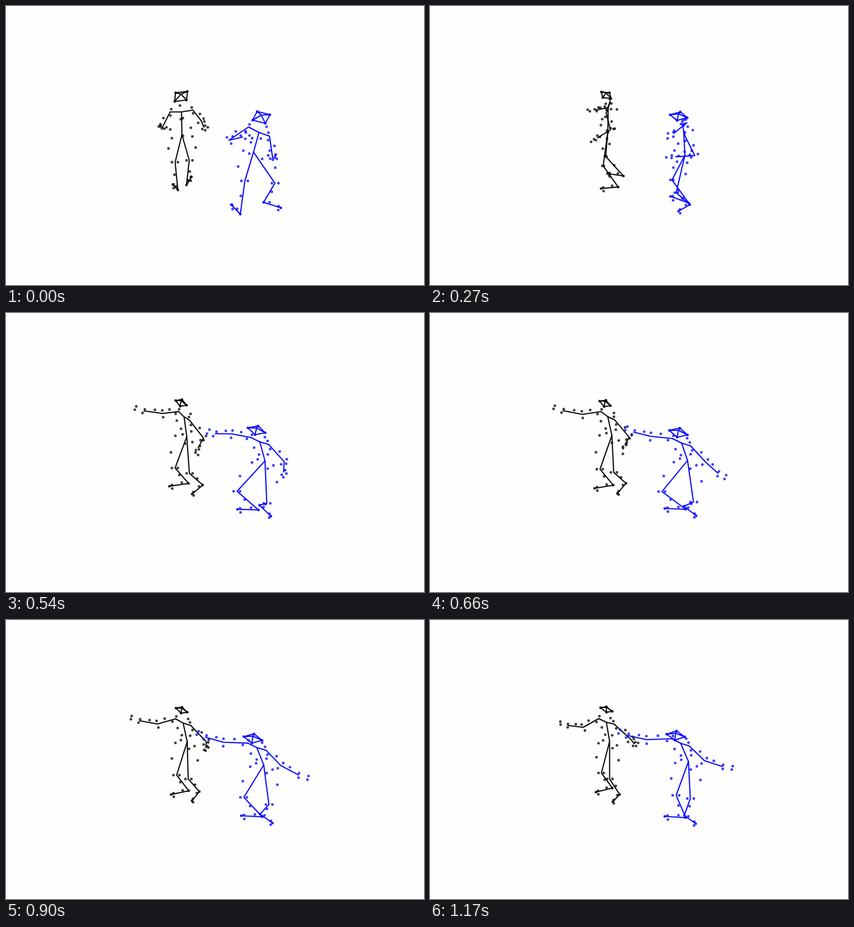
Recreate the animation shown at these times as an HTML page with a canvas. Size 917x611 px, loop 1200 ms.

```html
<!DOCTYPE html>
<html lang="en">
<head>
<meta charset="utf-8">
<title>Two motion-capture skeletons</title>
<style>
html, body { margin: 0; width: 100%; height: 100%; overflow: hidden; background: #fefefe; }
canvas { display: block; }
</style>
</head>
<body>
<canvas id="stage" width="917" height="611"></canvas>
<script>
const ctx = document.getElementById('stage').getContext('2d');
const LOOP = 1200, STEP = 30, TILT = 0.6;
const times = [0, 180, 390, 660, 1170];

// x, y at the key times. l/r: left/right; s shoulder, e elbow, w wrist, k knee, a ankle, t toe.
// The left shoulder and left head corners mirror the right ones through chest and head.
const small = {
  head:  [384,198, 387,196, 385,195, 384,198, 387,196],
  rf:    [398,187, 379,186, 373,189, 372,193, 374,192],
  rb:    [396,206, 397,195, 388,187, 386,191, 387,190],
  chest: [385,230, 390,221, 391,225, 390,225, 387,222],
  rs:    [410,228, 403,212, 385,214, 375,216, 370,216],
  pelvis:[386,282, 389,275, 392,275, 399,268, 394,266],
  le: [345,262, 375,268, 421,274, 437,272, 440,261],
  lw: [343,266, 342,278, 405,300, 428,288, 448,271],
  re: [428,251, 408,228, 365,220, 334,222, 336,235],
  rw: [434,265, 391,237, 330,220, 292,214, 303,231],
  lk: [371,342, 369,347, 396,353, 403,349, 394,348],
  la: [377,403, 399,403, 428,386, 430,373, 416,382],
  lt: [366,391, 361,399, 397,399, 411,395, 401,398],
  rk: [402,338, 396,328, 372,334, 373,342, 376,335],
  ra: [396,392, 435,378, 403,368, 402,377, 400,368],
  rt: [407,374, 409,366, 362,371, 361,384, 364,377]
};
const large = {
  head:  [560,244, 541,239, 554,247, 545,262, 539,253],
  rf:    [579,238, 523,232, 536,241, 525,257, 519,250],
  rb:    [569,257, 547,230, 558,238, 548,252, 541,243],
  chest: [555,275, 552,271, 562,274, 552,283, 550,268],
  rs:    [578,285, 558,260, 547,264, 532,275, 531,260],
  pelvis:[543,320, 550,328, 570,324, 565,323, 567,310],
  le: [489,294, 551,327, 610,323, 604,326, 602,308],
  lw: [519,287, 522,321, 569,338, 632,351, 642,321],
  re: [584,326, 590,264, 522,257, 484,270, 475,262],
  rw: [585,333, 569,289, 488,271, 447,261, 434,253],
  lk: [524,383, 528,401, 558,416, 578,414, 571,391],
  la: [514,456, 572,446, 557,422, 557,423, 558,428],
  lt: [494,435, 524,449, 570,447, 584,444, 583,446],
  rk: [590,388, 549,378, 513,387, 509,391, 540,384],
  ra: [565,430, 581,430, 548,433, 561,430, 561,433],
  rt: [603,442, 552,411, 504,430, 515,428, 515,430]
};

// Markers along a limb: distance in bones from its root, then pixels to the side.
const armMarks = [[0.2, -4], [0.55, 7], [1, 7], [1, -8], [1.4, 6], [1.95, 4], [2.1, -5], [2.4, 8], [2.5, 0]];
const legMarks = [[0.5, 22], [1, 7], [1, -6], [1.45, 4]];
const footMarks = [[0.35, -4], [0.87, -2], [0.85, 6]];
// Markers on the trunk: height from neck to pelvis, shares of the right and front axes, pixels down.
const trunkMarks = [[0, 0, 1, 1], [0, 0, -0.9, 0], [0.5, 0, 0.6, 0], [0.8, 0, -0.7, 2]];
for (const side of [-0.9, 0.9])
  trunkMarks.push([0, side, 0, -8], [1, side, 0.9, 0], [1, side, -0.1, 4]);

const bones = ['lf rf rb lb lf', 'lf crown rf', 'rb crown lb', 'neck pelvis', 'ls neck rs',
  'ls le lw', 'rs re rw', 'pelvis lk la lt', 'pelvis rk ra rt'].map(chain => chain.split(' '));
const solidDots = ['lf', 'rf', 'rb', 'lb', 'la', 'lt', 'ra', 'rt'];
const pivots = { rf: 'head', rb: 'head', rs: 'chest' };

// Smooth curve through values at the key times.
function curve(values, t) {
  let i = 0;
  while (i < times.length - 2 && t >= times[i + 1]) i++;
  const slope = k => {
    const a = Math.max(k - 1, 0), b = Math.min(k + 1, times.length - 1);
    return (values[b] - values[a]) / (times[b] - times[a]);
  };
  const span = times[i + 1] - times[i], u = (t - times[i]) / span;
  return values[i] + (values[i + 1] - values[i]) * u * u * (3 - 2 * u)
    + span * u * (1 - u) * ((1 - u) * slope(i) - u * slope(i + 1));
}

const axis = (list, c) => list.filter((_, i) => i % 2 === c);
const path = list => t => [curve(axis(list, 0), t), curve(axis(list, 1), t)];

// A point that turns around a moving pivot.
function orbit(list, pivot) {
  const center = path(pivot), arm = list.map((v, i) => v - pivot[i]);
  const xs = axis(arm, 0), ys = axis(arm, 1), angles = [];
  xs.forEach((x, i) => {
    const angle = Math.atan2(ys[i], x), full = 2 * Math.PI;
    angles.push(i ? angle - full * Math.round((angle - angles[i - 1]) / full) : angle);
  });
  const radii = xs.map((x, i) => Math.hypot(x, ys[i]));
  return t => {
    const [x, y] = center(t), angle = curve(angles, t), r = curve(radii, t);
    return [x + r * Math.cos(angle), y + r * Math.sin(angle)];
  };
}

const mirror = (p, c) => [2 * c[0] - p[0], 2 * c[1] - p[1]];
const lerp = (a, b, u) => [a[0] + (b[0] - a[0]) * u, a[1] + (b[1] - a[1]) * u];

function makeFigure(joints, color, size) {
  const moves = {};
  for (const name in joints)
    moves[name] = pivots[name] ? orbit(joints[name], joints[pivots[name]]) : path(joints[name]);
  return { moves, color, size };
}

function poseAt({ moves }, t) {
  const pose = {};
  for (const name in moves) pose[name] = moves[name](t);
  const { head, chest, rf, rb, rs } = pose;
  pose.lb = mirror(rf, head);
  pose.lf = mirror(rb, head);
  pose.ls = mirror(rs, chest);
  pose.crown = [head[0], head[1] - 5];
  pose.neck = [chest[0], chest[1] + 2];
  return pose;
}

function dot([x, y]) {
  ctx.beginPath();
  ctx.arc(x, y, 2.9, 0, 2 * Math.PI);
  ctx.fill();
}

function limbDots(chain, marks, [nx, ny], size) {
  for (const [along, aside] of marks) {
    const i = Math.min(Math.floor(along), chain.length - 2);
    const [x, y] = lerp(chain[i], chain[i + 1], along - i);
    dot([x + nx * aside * size, y + ny * aside * size]);
  }
}

// Unit normal of a bone, on its upper side.
function upperNormal(a, b) {
  const dx = b[0] - a[0], dy = b[1] - a[1];
  const scale = (dx < 0 ? -1 : 1) / Math.hypot(dx, dy);
  return [dy * scale, -dx * scale];
}

function drawMarkers(pose, size) {
  const { neck, pelvis, chest, rs, lk, rk } = pose;
  const right = [rs[0] - chest[0], rs[1] - chest[1]];
  const front = [right[1] / TILT, -right[0] * TILT];
  for (const [height, r, f, down] of trunkMarks) {
    const [x, y] = lerp(neck, pelvis, height);
    dot([x + r * right[0] + f * front[0], y + r * right[1] + f * front[1] + down * size]);
  }
  const spread = Math.max(-1, Math.min(1, (rk[0] - lk[0]) / 20));
  for (const [side, outward] of [['l', -spread], ['r', spread]]) {
    const [s, e, w, k, a, toe] = [...'sewkat'].map(part => pose[side + part]);
    limbDots([s, e, w], armMarks, upperNormal(s, e), size);
    limbDots([pelvis, k, a], legMarks, [outward, 0], size);
    limbDots([a, toe], footMarks, [0, 1], size);
  }
}

function drawFigure(figure, t) {
  const pose = poseAt(figure, t);
  ctx.strokeStyle = ctx.fillStyle = figure.color;
  ctx.globalAlpha = 0.75;
  drawMarkers(pose, figure.size);
  solidDots.forEach(name => dot(pose[name]));
  ctx.globalAlpha = 0.95;
  for (const chain of bones) {
    ctx.beginPath();
    chain.forEach(name => ctx.lineTo(...pose[name]));
    ctx.stroke();
  }
}

const figures = [makeFigure(small, '#000', 1), makeFigure(large, '#00f', 1.1)];
ctx.lineWidth = 2.6;
ctx.lineCap = ctx.lineJoin = 'round';

function draw() {
  const t = Math.floor(performance.now() % LOOP / STEP) * STEP;
  ctx.globalAlpha = 1;
  ctx.fillStyle = '#fefefe';
  ctx.fillRect(0, 0, 917, 611);
  figures.forEach(figure => drawFigure(figure, t));
  requestAnimationFrame(draw);
}
draw();
</script>
</body>
</html>
```
